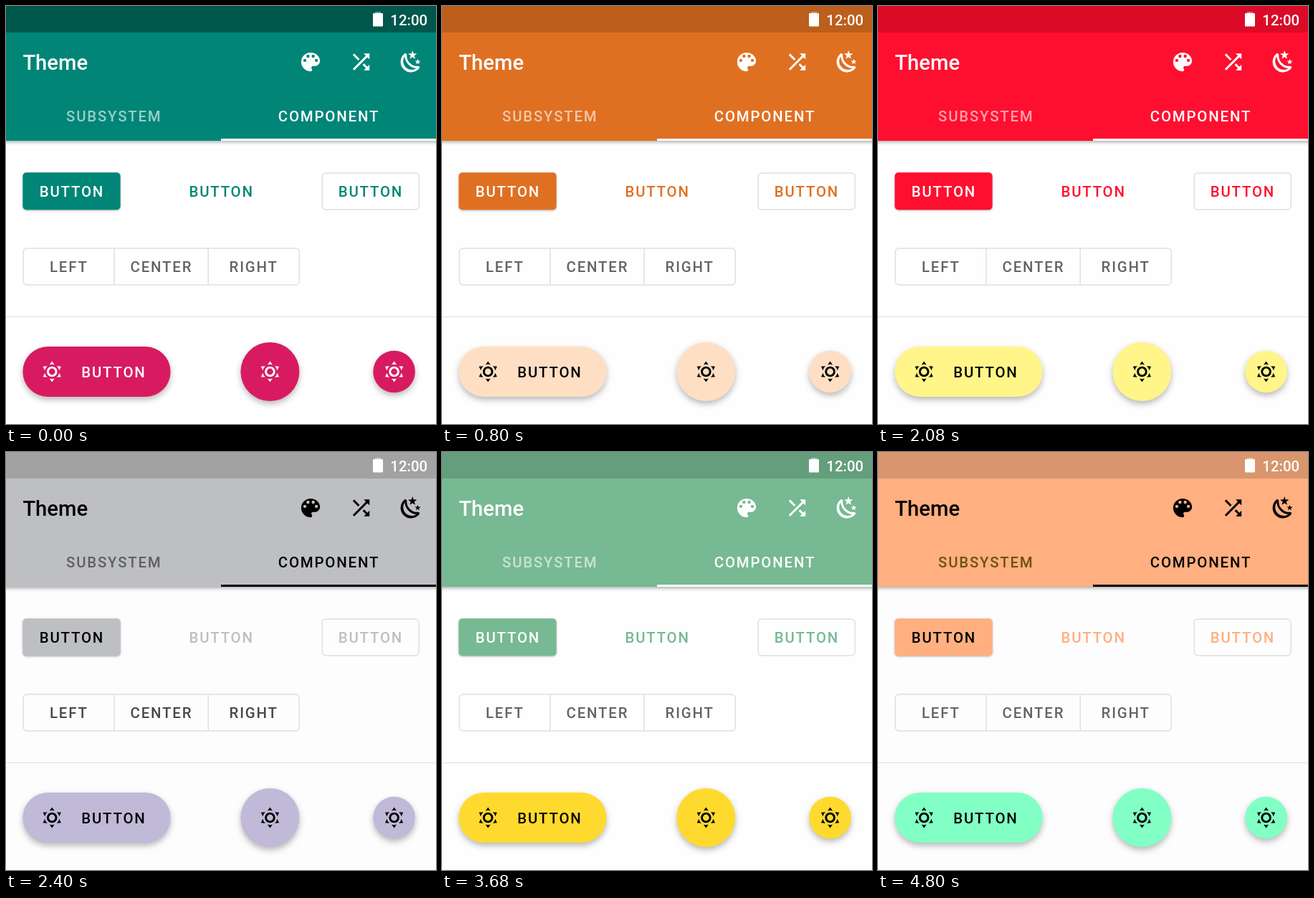
Recreate the animation shown at these times as an HTML page. Size 600 by 583 pixels, loop 5.6 s.

```html
<!DOCTYPE html>
<html lang="en">
<head>
<meta charset="utf-8">
<title>Theme colours</title>
<style>
  html, body { margin: 0; height: 100%; overflow: hidden; }
  svg { display: block; width: 600px; height: 583px; background: var(--page); }
  text { font: 500 20.4px Roboto, sans-serif; letter-spacing: 1.82px; }
  .title { font-size: 29.2px; letter-spacing: 0; }
  .clock { letter-spacing: 0; }
  .status { fill: var(--status); }
  .bar { fill: var(--bar); }
  .dots { stroke: var(--bar); stroke-width: 3; stroke-linecap: round; }
  .on-bar { fill: var(--onBar); }
  .tab { fill: var(--tab); }
  .group { fill: var(--group); }
  .fab { fill: var(--fab); }
  .on-fab { fill: var(--onFab); }
  .ring { fill: none; stroke: var(--onFab); stroke-width: 2; }
  .white { fill: #fff; }
  .line { fill: none; stroke: #e0e0e0; stroke-width: 1.5; }
  .low { filter: drop-shadow(0 1.5px 1.5px rgba(0, 0, 0, .3)); }
  .mid { filter: drop-shadow(0 2px 2.5px rgba(0, 0, 0, .32)); }
  .high { filter: drop-shadow(0 4px 4px rgba(0, 0, 0, .28)); }
</style>
</head>
<body>
<svg viewBox="0 0 600 583">
  <defs>
    <path id="ray" d="M12 2l2.39 3.42a7 7 0 0 0-4.78 0z"/>
    <g id="sun" class="on-fab" transform="scale(1.46) translate(-12 -12)">
      <circle class="ring" cx="12" cy="12" r="4"/>
      <use href="#ray"/>
      <use href="#ray" transform="rotate(60 12 12)"/>
      <use href="#ray" transform="rotate(120 12 12)"/>
      <use href="#ray" transform="rotate(180 12 12)"/>
      <use href="#ray" transform="rotate(240 12 12)"/>
      <use href="#ray" transform="rotate(300 12 12)"/>
    </g>
  </defs>

  <rect class="bar mid" x="-10" y="-10" width="620" height="198"/>
  <rect class="status" width="600" height="37"/>
  <g class="white">
    <path d="M515 8h8v2h-8z" opacity=".4"/>
    <rect x="512" y="10" width="14" height="18.5" rx="1"/>
    <text class="clock" x="536.3" y="26.5">12:00</text>
  </g>

  <g class="on-bar">
    <text class="title" x="23.4" y="88.8">Theme</text>
    <text x="379.8" y="161.3">COMPONENT</text>
    <path d="M300 185h300v3H300z"/>
    <g transform="translate(407.5 60.5) scale(1.46)">
      <path d="M12 3a9 9 0 0 0 0 18c.83 0 1.5-.67 1.5-1.5 0-.39-.15-.74-.39-1.01-.23-.26-.38-.61-.38-.99 0-.83.67-1.5 1.5-1.5H16c2.76 0 5-2.24 5-5 0-4.42-4.03-8-9-8z"/>
      <path class="dots" d="M6.5 10.5h0M9.5 6.5h0M14.5 6.5h0M17.5 10.5h0"/>
    </g>
    <path transform="translate(478 60.5) scale(1.46)" d="M10.59 9.17L5.41 4 4 5.41l5.17 5.17zM14.5 4l2.04 2.04L4 18.59 5.41 20 17.96 7.46 20 9.5V4zM14.83 13.41l-1.41 1.41 3.13 3.13L14.5 20H20v-5.5l-2.04 2.04z"/>
    <g transform="translate(547.5 60.5) scale(1.46)">
      <path id="star" d="M13.5 1l1.06 3 3.19.09-2.53 1.94.91 3.06-2.63-1.81-2.63 1.81.91-3.06-2.53-1.94L12.44 4z"/>
      <use href="#star" transform="translate(9.72 8.35) scale(.65)"/>
      <path fill-rule="evenodd" d="M18.97 15.95c.83-.08 1.72 1.1 1.19 1.85q-.48.67-1.08 1.27A10 10 0 0 1 4.94 4.93q.6-.6 1.27-1.08c.75-.53 1.93.36 1.85 1.19a10 10 0 0 0 10.91 10.91zM17.33 17.97A12 12 0 0 1 6.04 6.68a8.1 8.1 0 0 0 11.29 11.29z"/>
    </g>
  </g>
  <text class="tab" x="84" y="161.3">SUBSYSTEM</text>

  <rect class="bar low" x="23.4" y="232.3" width="136.2" height="52" rx="5"/>
  <text class="on-bar" x="46.8" y="266.3">BUTTON</text>
  <text class="accent" x="255.5" y="266.3" fill="var(--bar)">BUTTON</text>
  <text class="accent" x="463.8" y="266.3" fill="var(--bar)">BUTTON</text>
  <g class="line">
    <rect x="441.2" y="233" width="135" height="51" rx="5"/>
    <rect x="24.2" y="338" width="385" height="51" rx="5"/>
    <path d="M151 338v51M282.2 338v51"/>
    <path d="M0 433.5h600" stroke-width="1.2"/>
  </g>
  <g class="group">
    <text x="61" y="371.3">LEFT</text>
    <text x="173.6" y="371.3">CENTER</text>
    <text x="311.6" y="371.3">RIGHT</text>
  </g>

  <g class="fab high">
    <rect x="23.4" y="475" width="206.2" height="70" rx="35"/>
    <circle cx="368.4" cy="510" r="41"/>
    <circle cx="541.6" cy="510" r="29.3"/>
  </g>
  <text class="on-fab" x="105.3" y="517.8">BUTTON</text>
  <use href="#sun" x="64.2" y="510"/>
  <use href="#sun" x="368.4" y="510"/>
  <use href="#sun" x="541.6" y="510"/>
</svg>
<script>
  const HOLD = 800;
  const base = {
    page: '#fefefe', onBar: '#fff', tab: 'rgba(255,255,255,.6)',
    group: '#646464', onFab: '#000'
  };
  const themes = [
    { status: '#00574b', bar: '#008577', fab: '#d81b60', onFab: '#fff', page: '#fff' },
    { status: '#bc5e1c', bar: '#df7022', fab: '#ffdfc4' },
    { status: '#db0b28', bar: '#ff0f2f', fab: '#fff589' },
    { status: '#a2a2a3', bar: '#bebfc2', fab: '#c0b9d8', onBar: '#000', tab: '#606062', group: '#484848', page: '#fdfdfd' },
    { status: '#659e7d', bar: '#76b992', fab: '#ffda2e' },
    { status: '#875e94', bar: '#9f6eae', fab: '#fffee9' },
    { status: '#d9956d', bar: '#ffaf80', fab: '#82ffc5', onBar: '#000', tab: '#6b5216', page: '#fdfdfd' }
  ];
  const rootStyle = document.documentElement.style;
  let shown = -1;

  function draw() {
    const index = Math.floor(performance.now() / HOLD) % themes.length;
    if (index !== shown) {
      shown = index;
      for (const [name, colour] of Object.entries({ ...base, ...themes[index] }))
        rootStyle.setProperty('--' + name, colour);
    }
    requestAnimationFrame(draw);
  }
  draw();
</script>
</body>
</html>
```
